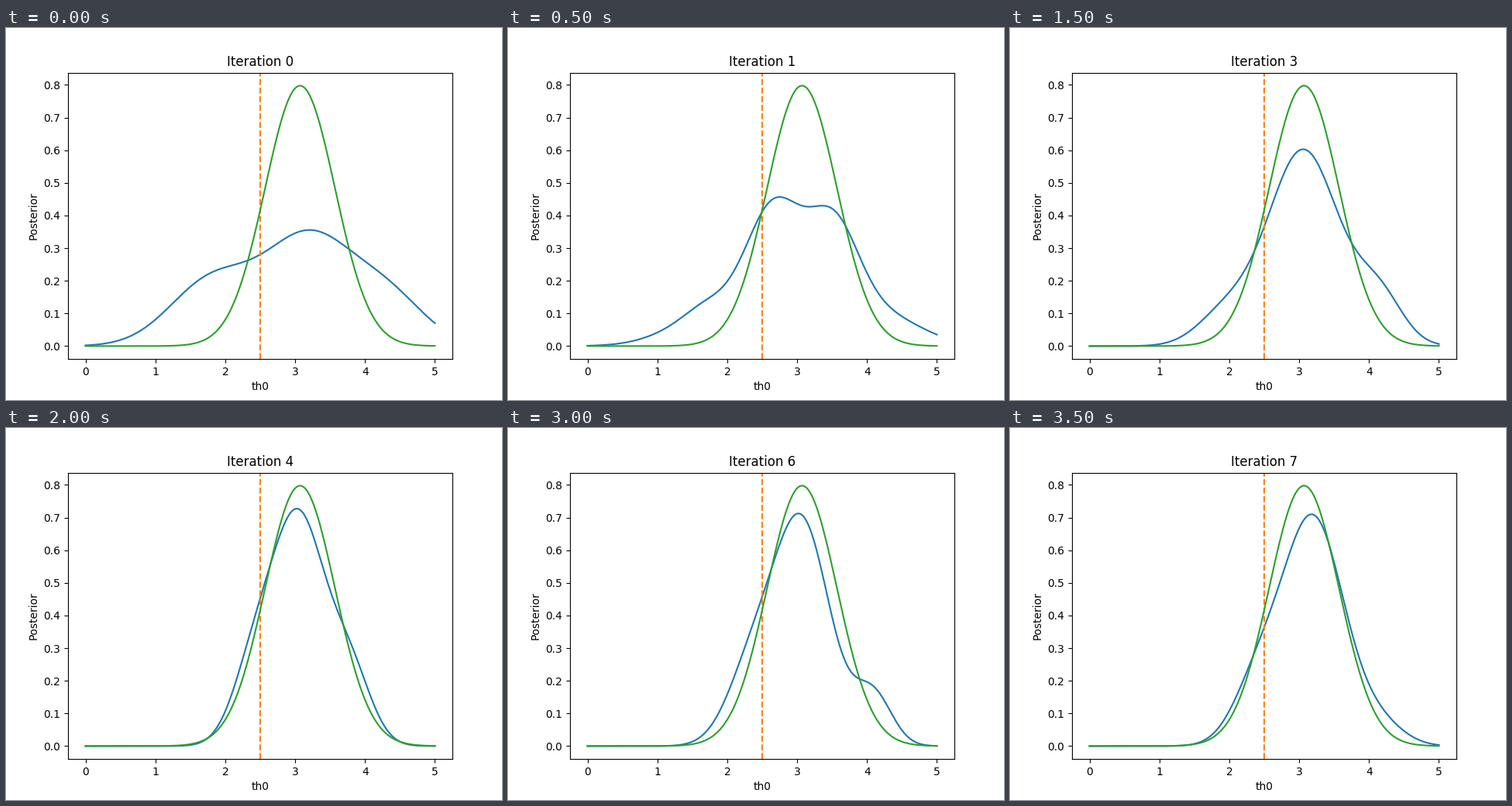
Recreate the animation shown at these times as a matplotlib script. Size 640 by 480 pixels, loop 4 s.

```python
import matplotlib.pyplot as plt
import numpy as np
from matplotlib.animation import FuncAnimation

plt.rcParams["text.kerning_factor"] = 6  # whole-pixel letter spacing

STEP_MS = 500
TRUE_MEAN, TRUE_STD = 3.07, 0.5
GUIDE = 2.5

grid = np.linspace(0, 5, 200)


def bell(height, mean, std):
    return height * np.exp(-0.5 * ((grid - mean) / std) ** 2)


def mixture(*bells):
    return sum(bell(*b) for b in bells)


# Each estimate is a left shoulder, a main peak and a right shoulder.
broad = mixture((.195, 1.8, .6), (.33, 3.2, .64), (.135, 4.35, .53))
twin = mixture((.045, 1.67, .27), (.58, 2.65, .38), (.46, 3.53, .35))
shouldered = mixture((.097, 1.95, .4), (.6, 3.06, .51), (.147, 4.14, .34))
tall = mixture((.22, 2.41, .31), (.69, 3.05, .38), (.215, 3.79, .3))
left = mixture((.23, 2.36, .36), (.675, 3.07, .4), (.158, 4.08, .27))
right = mixture((.175, 2.4, .35), (.695, 3.2, .44), (.062, 4.15, .35))

estimates = [broad, (broad + twin) / 2, twin, shouldered,
             tall, (tall + left) / 2, left, right]
posterior = bell(1 / (TRUE_STD * np.sqrt(2 * np.pi)), TRUE_MEAN, TRUE_STD)

fig, ax = plt.subplots(figsize=(6.4, 4.8), dpi=100)
estimate, = ax.plot(grid, estimates[0], color="C0")
ax.axvline(GUIDE, color="C1", linestyle="--")
ax.plot(grid, posterior, color="C2")
peak = posterior.max()
ax.set_xlim(-0.25, 5.25)
ax.set_ylim(-0.05 * peak, 1.05 * peak)
ax.set_xlabel("th0")
ax.set_ylabel("Posterior")
title = ax.set_title("Iteration 0")


def update(i):
    estimate.set_ydata(estimates[i])
    title.set_text(f"Iteration {i}")
    return estimate, title


anim = FuncAnimation(fig, update, frames=len(estimates), interval=STEP_MS,
                     repeat=True, repeat_delay=0, blit=False)
plt.show()
```
